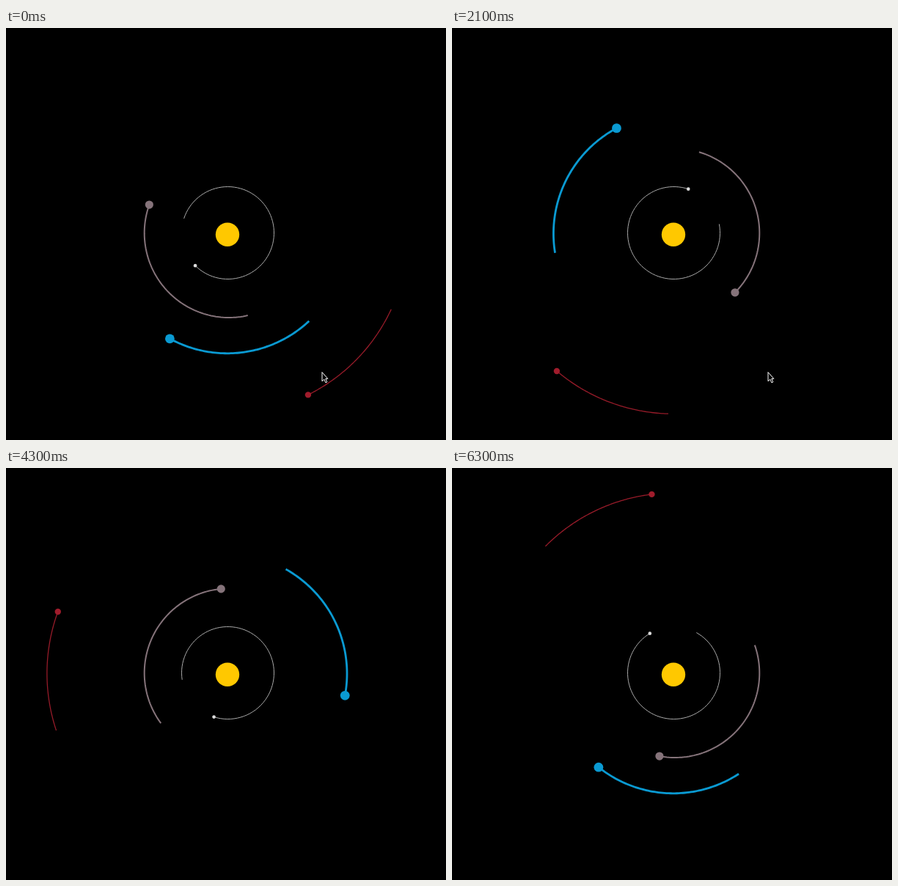
Write an HTML page with a canvas that moves like this. It is 600 px wide and 562 px high and loops after 6.4 s.

```html
<!DOCTYPE html>
<html lang="en">
<head>
<meta charset="utf-8">
<title>Orbits</title>
<style>
  html, body { margin: 0; width: 100%; height: 100%; overflow: hidden; background: #000; }
  canvas { display: block; }
</style>
</head>
<body>
<canvas id="stage" width="600" height="562"></canvas>
<script>
const ctx = document.getElementById('stage').getContext('2d');
const STEP = 100, STEPS = 64;
const TRAIL = 12.15;      // trail length in steps
const SEGMENTS = 73;      // one per simulated day
const CURSOR_STEPS = 34;
const RAD = Math.PI / 180;
const sun = { x: 302, y: 281.5 };

// x, y, r: orbit circle; start, rate: mean angle in degrees, per step
const planets = [
  { x: 302.5, y: 279.5, r: 63, start: 133.9, rate: 24.5, size: 2.3, width: 1, color: '#dcdcdc', trail: '#a9a9a9' },
  { x: 304, y: 279.7, r: 115.3, start: 198.4, rate: 9.888, size: 5.6, width: 2, color: '#85737a', trail: '#85737a' },
  { x: 301.7, y: 280.5, r: 163.3, start: 118.4, rate: 5.871, size: 6.4, width: 2.8, color: '#0a9ad2', trail: '#0a9ad2' },
  { x: 302, y: 280.2, r: 246.1, start: 63.6, rate: 3.166, size: 4.2, width: 1.3, color: '#a01c2c', trail: '#961b29' }
];

const cursor = new Path2D('M431 469.5V481.8L433.8 479.2L435.9 483.8L437.8 482.9L435.8 478.4H438.8Z');

// Slightly eccentric orbit: solve the centre angle from the mean angle
function position(p, step) {
  const mean = (p.start + p.rate * step) * RAD;
  const ex = (p.x - sun.x) / p.r, ey = (p.y - sun.y) / p.r;
  let a = mean;
  for (let i = 0; i < 3; i++) a = mean - ex * Math.sin(a) + ey * Math.cos(a);
  return [p.x + p.r * Math.cos(a), p.y + p.r * Math.sin(a)];
}

function disc(x, y, r, color) {
  ctx.fillStyle = color;
  ctx.beginPath();
  ctx.arc(x, y, r, 0, 2 * Math.PI);
  ctx.fill();
}

function drawPlanet(p, step) {
  ctx.beginPath();
  for (let i = 0; i <= SEGMENTS; i++) {
    ctx.lineTo(...position(p, step - TRAIL * (1 - i / SEGMENTS)));
  }
  ctx.strokeStyle = p.trail;
  ctx.lineWidth = p.width;
  ctx.stroke();
  disc(...position(p, step), p.size, p.color);
}

function drawCursor() {
  ctx.fillStyle = '#000';
  ctx.fill(cursor);
  ctx.strokeStyle = '#fff';
  ctx.lineWidth = 1;
  ctx.stroke(cursor);
}

function draw(now) {
  const step = Math.floor(now / STEP) % STEPS;
  ctx.fillStyle = '#000';
  ctx.fillRect(0, 0, 600, 562);
  disc(302, 281.8, 16.2, '#ffc800');
  for (const p of planets) drawPlanet(p, step);
  if (step < CURSOR_STEPS) drawCursor();
}

const begin = performance.now();
function tick() {
  draw(performance.now() - begin);
  requestAnimationFrame(tick);
}
tick();
</script>
</body>
</html>
```
